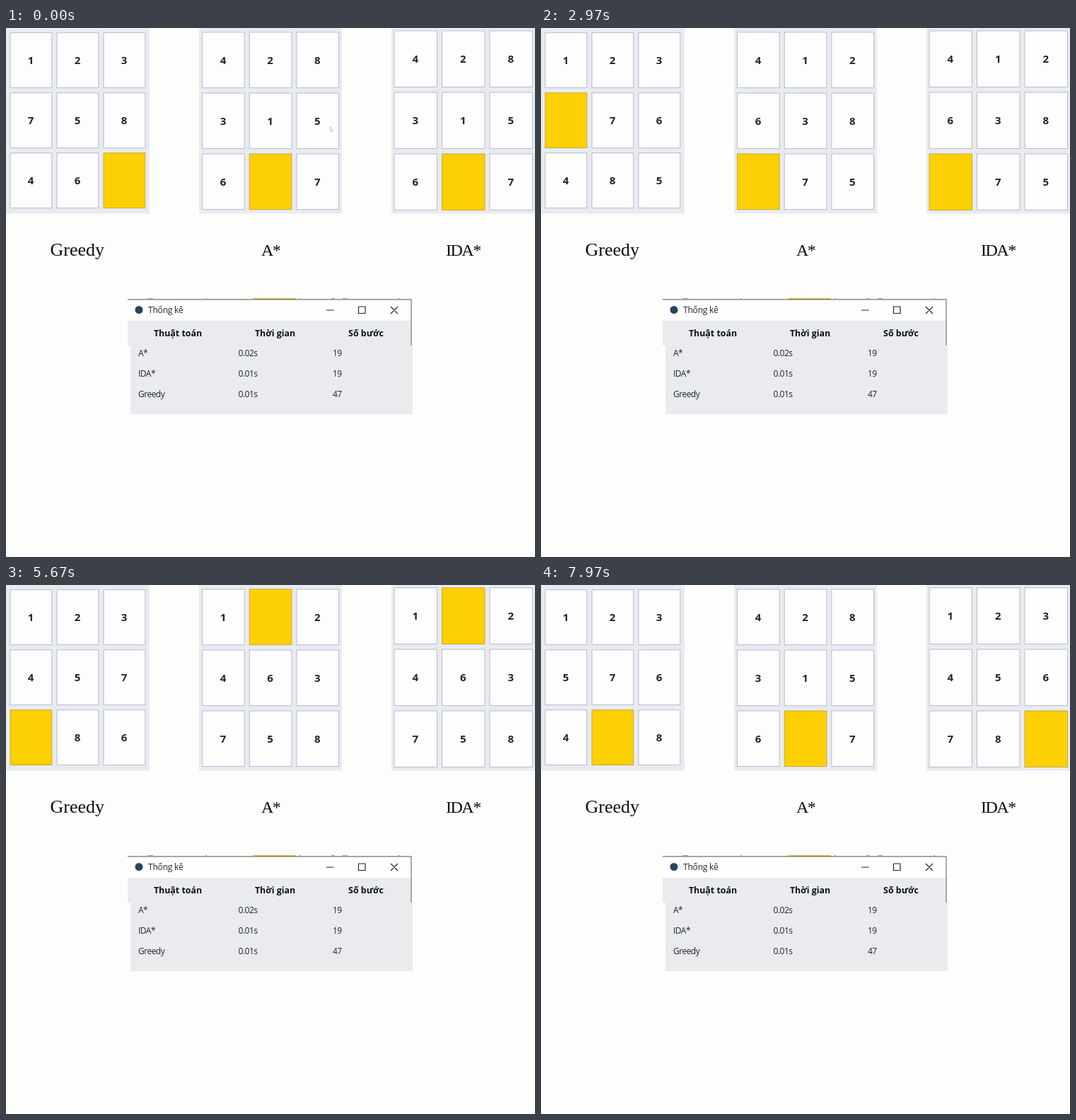
Write an HTML page that moves like this. It is 748 by 748 pixels and loops after 8 s.

```html
<!DOCTYPE html>
<html lang="vi">
<head>
<meta charset="utf-8">
<title>8-puzzle</title>
<style>
html, body { margin: 0; width: 100%; height: 100%; overflow: hidden; background: #fdfdfb; }
svg { display: block; width: 100vw; height: 100vh; }
text { font-family: "Open Sans", "Noto Sans", sans-serif; fill: #20242c; }
.num { font-size: 15px; font-weight: 700; text-anchor: middle; }
.name { font-family: "Liberation Serif", "Noto Serif", serif; fill: #0c0c0c; }
.head { font-size: 12.4px; font-weight: 700; text-anchor: middle; fill: #0c0f16; }
.cell { font-size: 12px; letter-spacing: -0.5px; }
</style>
</head>
<body>
<svg id="stage" viewBox="0 0 748 748"></svg>
<script>
const LOOP = 8000, STEP = 410, LEAD = 150, RESTART = 7900;
const PANEL = '#e9ebef';
const svg = document.getElementById('stage');

function add(tag, attrs, text) {
  const el = document.createElementNS('http://www.w3.org/2000/svg', tag);
  for (const k in attrs) el.setAttribute(k, attrs[k]);
  if (text !== undefined) el.textContent = text;
  return svg.appendChild(el);
}
const rect = (x, y, width, height, fill, more) => add('rect', { x, y, width, height, fill, ...more });
const label = (x, y, cls, text, more) => add('text', { x, y, class: cls, ...more }, text);

// Blank moves: each letter is the direction the empty cell travels
const SHIFT = { L: -1, R: 1, U: -3, D: 3 };
const SOLUTION = 'RUULDLDRRULLURRDLDR';
const boards = [
  { x: 0, w: 203, tx: 6, ty: 6.7, tw: 58.8, th: 77.8, dx: 66, dy: 85,
    start: '123758460', moves: 'LURDLULDRRULDLURRDL' },
  { x: 273, w: 202, tx: 277.5, ty: 6, tw: 59.7, th: 78.6, dx: 66.7, dy: 86,
    start: '428315607', moves: SOLUTION, restart: RESTART },
  { x: 545, w: 203, tx: 549, ty: 4, tw: 60.5, th: 79.5, dx: 67.5, dy: 87,
    start: '428315607', moves: SOLUTION }
];

function solve(start, moves) {
  const states = [start];
  const cells = [...start];
  let blank = cells.indexOf('0');
  for (const m of moves) {
    const next = blank + SHIFT[m];
    cells[blank] = cells[next];
    cells[next] = '0';
    blank = next;
    states.push(cells.join(''));
  }
  return states;
}

function buildBoard(b) {
  rect(b.x, 0, b.w, 262.5, PANEL);
  b.states = solve(b.start, b.moves);
  b.tiles = Array.from({ length: 9 }, (_, i) => {
    const x = b.tx + (i % 3) * b.dx, y = b.ty + Math.floor(i / 3) * b.dy;
    return {
      box: rect(x, y, b.tw, b.th, '#fdfdfd', { 'stroke-width': 1 }),
      num: label(x + b.tw / 2 - 0.4, y + b.th / 2 + 5.6, 'num', '')
    };
  });
}

function buildWindow() {
  rect(349, 382, 61, 2, '#e0c020');
  for (const [x, w] of [[200, 8], [282, 2], [415, 2], [460, 5], [476, 7], [555, 2]])
    rect(x, 382, w, 1, '#a5a595');
  rect(172, 384, 401, 30, '#fefefe');
  rect(172, 414, 401, 35, PANEL);
  rect(176, 449, 399, 97, PANEL);
  add('path', { d: 'M172 383.8H573V449', fill: 'none', stroke: '#77776f', 'stroke-width': 1.2 });
  add('circle', { cx: 188, cy: 398.5, r: 5.5, fill: '#26465f' });
  label(201, 403, '', 'Thống kê', { 'font-size': 12, 'letter-spacing': -0.2 });
  add('path', {
    d: 'M453 399H463.5M498.5 394H508V403.5H498.5ZM544 394L554 404M554 394L544 404',
    fill: 'none', stroke: '#22252b', 'stroke-width': 1.2
  });
  label(243, 435.5, 'head', 'Thuật toán');
  label(380.5, 435.5, 'head', 'Thời gian');
  label(509, 435.5, 'head', 'Số bước');
  [['A*', '0.02s', '19'], ['IDA*', '0.01s', '19'], ['Greedy', '0.01s', '47']].forEach((row, r) =>
    row.forEach((text, c) => label([187, 328.5, 462][c], 463.7 + r * 29, 'cell', text)));
}

boards.forEach(buildBoard);
label(62.5, 322, 'name', 'Greedy', { 'font-size': 26 });
label(361, 322, 'name', 'A*', { 'font-size': 24, 'letter-spacing': -1.5 });
label(622, 322, 'name', 'IDA*', { 'font-size': 24, 'letter-spacing': -1.5 });
buildWindow();
const cursor = add('path', {
  d: 'M458.5 139.5V146L460 144.8L461 147L462 146.5L461 144.3H462.5Z',
  fill: '#fefefe', stroke: '#c3c3a4', 'stroke-width': 0.8
});

function draw(t) {
  for (const b of boards) {
    const done = Math.floor((t + LEAD) / STEP);
    const n = t >= (b.restart || LOOP) ? 0 : Math.min(done, b.moves.length);
    if (n === b.shown) continue;
    b.shown = n;
    b.tiles.forEach(({ box, num }, i) => {
      const v = b.states[n][i], empty = v === '0';
      box.setAttribute('fill', empty ? '#fdd003' : '#fdfdfd');
      box.setAttribute('stroke', empty ? '#c8aa38' : '#b6bbd2');
      num.textContent = empty ? '' : v;
    });
  }
  cursor.setAttribute('visibility', t < STEP - LEAD ? 'visible' : 'hidden');
}

const began = performance.now();
function tick() {
  draw((performance.now() - began) % LOOP);
  requestAnimationFrame(tick);
}
tick();
</script>
</body>
</html>
```
